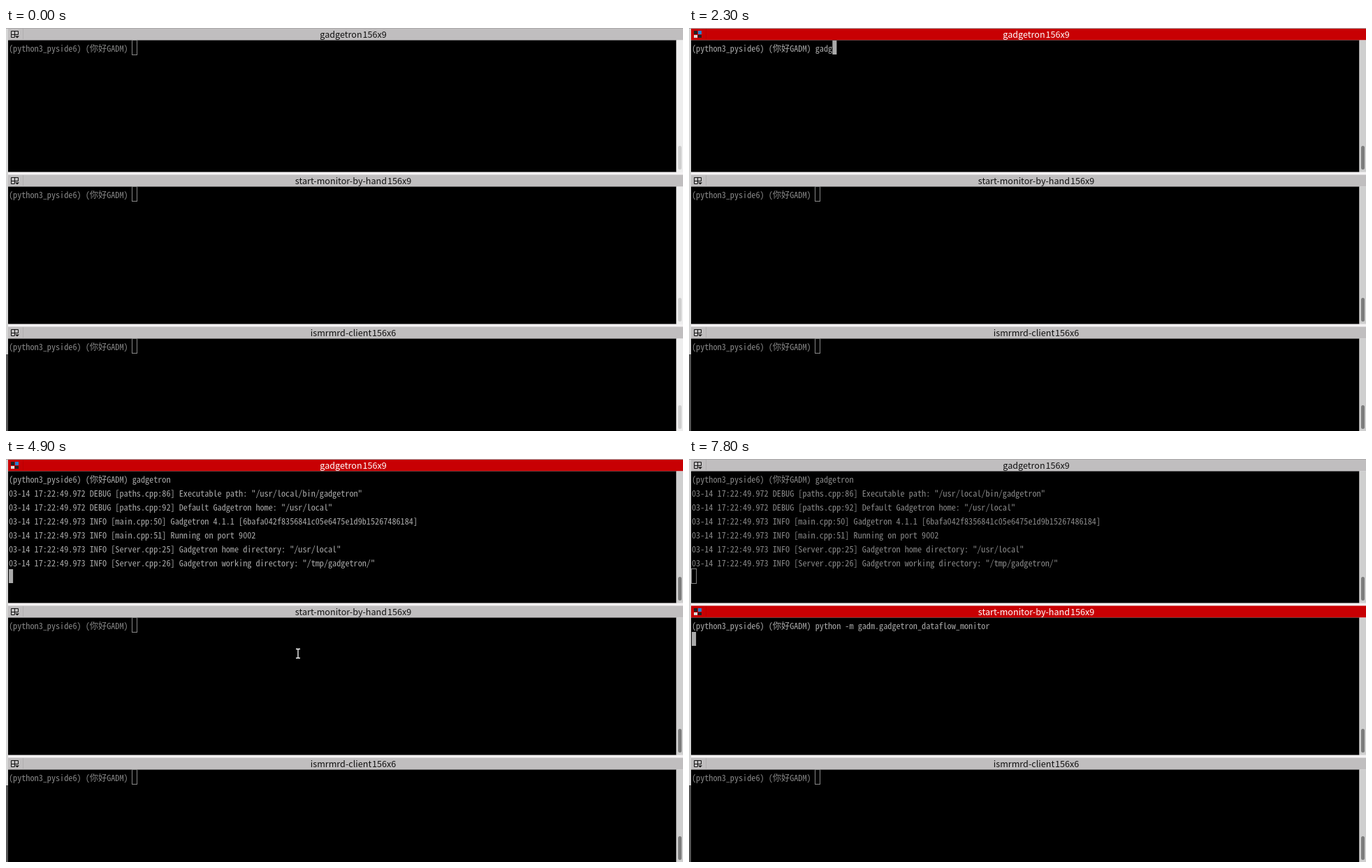
Recreate the animation shown at these times as an HTML page. Size 969 by 578 pixels, loop 8000 ms.

```html
<!DOCTYPE html>
<html lang="en">
<head>
<meta charset="utf-8">
<title>Terminal session</title>
<style>
  html, body { margin: 0; width: 100%; height: 100%; overflow: hidden; background: #000; }
  svg { display: block; }
  text { white-space: pre; }
  .mono { font: 12.2px "Noto Sans Mono CJK SC", "Noto Sans CJK SC", "Noto Sans Mono", monospace; }
  .title { font: 12.6px "Noto Sans CJK SC", "Noto Sans", sans-serif; word-spacing: -2px; text-anchor: middle; }
</style>
</head>
<body>
<svg id="stage" width="969" height="578" viewBox="0 0 969 578"></svg>
<script>
const LOOP = 8000, CELL = 6.1, ROW = 20, LEFT = 4;
const stage = document.getElementById('stage');
const PROMPT = '(python3_pyside6) (你好GADM) ';
const PROMPT_COLS = 29;
const SERVER = 'gadgetron', MONITOR = 'python -m gadm.gadgetron_dataflow_monitor';
const LOG = [
  '972 DEBUG [paths.cpp:86] Executable path: "/usr/local/bin/gadgetron"',
  '972 DEBUG [paths.cpp:92] Default Gadgetron home: "/usr/local"',
  '973 INFO [main.cpp:50] Gadgetron 4.1.1 [6bafa042f8356841c05e6475e1d9b15267486184]',
  '973 INFO [main.cpp:51] Running on port 9002',
  '973 INFO [Server.cpp:25] Gadgetron home directory: "/usr/local"',
  '973 INFO [Server.cpp:26] Gadgetron working directory: "/tmp/gadgetron/"'
].map(s => '03-14 17:22:49.' + s);

const PANES = [
  { title: 'gadgetron 156x9', top: 0, end: 206.5 },
  { title: 'start-monitor-by-hand 156x9', top: 210, end: 424.5 },
  { title: 'ismrmrd-client 156x6', top: 428, end: 578.5 }
];

const rect = (x, y, w, h, fill, extra = '') =>
  `<rect x="${x}" y="${y}" width="${w}" height="${h}" fill="${fill}" ${extra}/>`;
const path = (d, stroke, width = 1, fill = 'none') =>
  `<path d="${d}" stroke="${stroke}" stroke-width="${width}" fill="${fill}"/>`;
const label = (kind, x, y, fill, s) =>
  `<text class="${kind}" x="${x}" y="${y}" fill="${fill}">${s}</text>`;
const mix = (a, b, k) => Math.round(a + (b - a) * Math.min(1, Math.max(0, k)));
const grey = v => `rgb(${v},${v},${v})`;

function menuIcon(y, active) {
  if (active) return rect(7, y + 4, 5, 5, '#222') + rect(13, y + 4, 5, 5, '#2a7fd0') +
    rect(7, y + 10, 5, 4, '#ddd') + rect(13, y + 10, 5, 4, '#222');
  return path(`M7.5 ${y + 4.5}h10v5h-10zM12.5 ${y + 4.5}v9M12 ${y + 13.5}h-4.5v-4`, '#111') +
    path(`M13 ${y + 11.5}h6l-3 3z`, 'none', 0, '#111');
}

const bell = () => `<circle cx="961" cy="7" r="4.5" fill="#ccc" stroke="#666"/>` +
  rect(959, 11, 4, 4, '#999');

const iBeam = (x, y) => {
  const d = `M${x - 3} ${y - 6.5}h2.5q.5 0 .5 1v11q0 1-.5 1h-2.5M${x + 3} ${y - 6.5}h-2.5q-.5 0-.5 1v11q0 1 .5 1h2.5`;
  return path(d, '#000', 3.4) + path(d, '#fff', 1.3);
};

const arrow = (x, y) =>
  path(`M${x} ${y}v15l3.5-3 2.5 5 2.5-1-2.5-5h5z`, '#fff', 1, '#000');

// Text lines and cursor position of each pane
function content(t) {
  const typed = t < 1400 ? 0 : t < 1700 ? 1 : t < 2000 ? 2 : t < 2300 ? 3 : t < 2800 ? 4 : 9;
  const logged = t >= 3500;
  const command = t < 6200 ? '' : MONITOR;
  const entered = t >= 7800;
  return [
    { lines: [PROMPT + SERVER.slice(0, typed), ...(logged ? LOG : [])],
      col: logged ? 0 : PROMPT_COLS + typed, row: logged ? 7 : 0,
      off: t >= 3400 && t < 3500 || t >= 4100 && t < 4700 },
    { lines: [PROMPT + command],
      col: entered ? 0 : PROMPT_COLS + command.length, row: entered ? 1 : 0,
      off: t >= 5700 && t < 6200 || t >= 6800 && t < 7400 },
    { lines: [PROMPT], col: PROMPT_COLS, row: 0 }
  ];
}

function pane({ title, top, end }, { lines, col, row, off }, active, ringing, t) {
  const ink = grey(active ? 170 : 136);
  const focus = (t - 1200) / 400;
  const body = top + 17.5, height = end - body;
  const cx = LEFT + col * CELL, cy = top + 18 + row * ROW;
  let s = rect(3, top + .5, 966, 17, active ? '#c80003' : '#c0bebf') + menuIcon(top, active);
  s += rect(24, top + 1, 1, 15, active ? '#b80003' : '#b0aeaf');
  s += label('title', ringing ? 488.5 : 497, top + 14, active ? '#fff' : '#111', title);
  if (ringing) s += bell();
  s += rect(3, body, 956.5, height, '#000');
  s += rect(959.5, body, 9.5, height, grey(t < 1200 ? 238 : mix(225, 207, focus)));
  s += rect(962, end - 37.5, 5, 34, t < 1200 ? '#cfcfcf' : '#7d7d7d', 'rx="2.5"');
  lines.forEach((line, i) => s += label('mono', LEFT, top + 34 + i * ROW, ink, line));
  if (!active) s += rect(cx - .4, cy - .5, CELL + .9, ROW + 1, 'none', `stroke="${ink}"`);
  else if (!off) s += rect(cx, cy, CELL, ROW, '#aaa');
  return s;
}

function pointer(t) {
  if (t >= 600 && t < 700) return arrow(526, 2);
  if (t >= 700 && t < 1400) return iBeam(503, 45.5);
  if (t >= 4200 && t < 6200) {
    const k = Math.min(1, (t - 4200) / 700), e = k * k * (3 - 2 * k);
    return iBeam(464 - 46 * e, 104 + 175 * e);
  }
  return '';
}

function scene(t) {
  const active = t < 1200 ? -1 : t < 5100 ? 0 : 1;
  const state = content(t);
  let s = rect(0, 0, 969, 578, '#f4f2f3') + rect(0, 0, 3, 468, '#d6d6d6') + rect(0, 468, 3, 110, '#555');
  PANES.forEach((p, i) =>
    s += pane(p, state[i], i === active, i === 0 && t >= 2800 && t < 3800, t));
  return s + rect(0, 0, 969, 1, '#a9a7a8') + pointer(t);
}

let last = '';
function tick(now) {
  const s = scene(Math.floor(now % LOOP / 100) * 100);
  if (s !== last) stage.innerHTML = last = s;
  requestAnimationFrame(tick);
}
tick(0);
</script>
</body>
</html>
```
